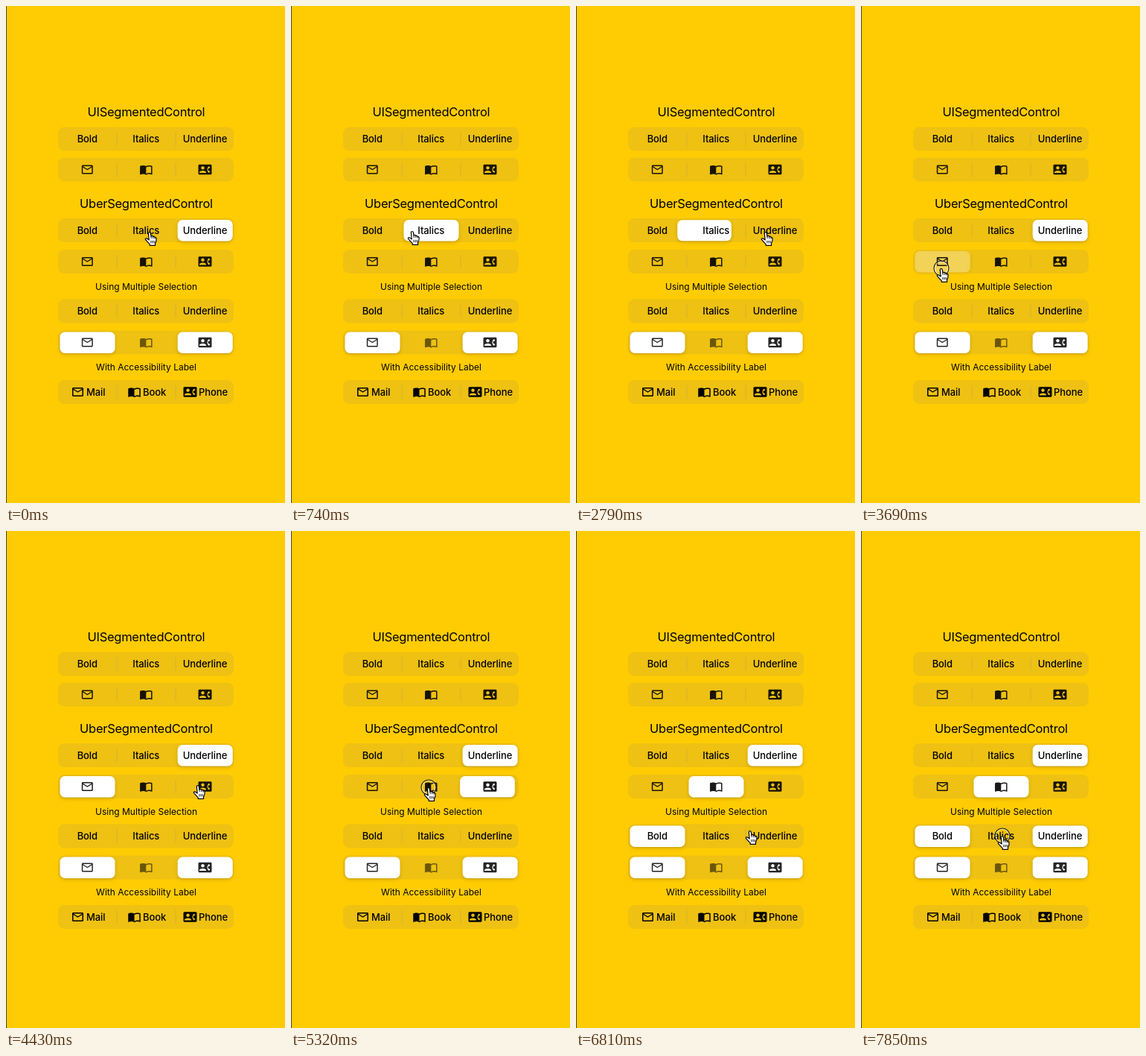
These frames come from a looping animation (375x667 px, 7.99 s). An HTML page:

```html
<!DOCTYPE html>
<html lang="en">
<head>
<meta charset="utf-8">
<title>Segmented controls</title>
<style>
  html, body { margin: 0; width: 100%; height: 100%; overflow: hidden; background: #ffcc03; }
  svg { display: block; width: 100vw; height: 100vh; }
  text { font-family: Inter, "Liberation Sans", sans-serif; fill: #000; text-anchor: middle; }
  .title { font-size: 16.5px; letter-spacing: -.28px; }
  .label { font-size: 13px; font-weight: 500; letter-spacing: -.1px; }
  .note { font-size: 12px; }
  .thumb { fill: #fff; filter: drop-shadow(0 2px 2.5px rgba(0, 0, 0, .16)); }
</style>
</head>
<body>
<svg id="stage" viewBox="0 0 375 667">
  <defs>
    <path id="mail" d="M20 4H4c-1.1 0-1.99.9-1.99 2L2 18c0 1.1.9 2 2 2h16c1.1 0 2-.9 2-2V6c0-1.1-.9-2-2-2zm0 14H4V8l8 5 8-5v10zm-8-7L4 6h16l-8 5z"/>
    <path id="book" d="M21 5c-1.11-.35-2.33-.5-3.5-.5-1.95 0-4.05.4-5.5 1.5-1.45-1.1-3.55-1.5-5.5-1.5S2.45 4.9 1 6v14.65c0 .25.25.5.5.5.1 0 .15-.05.25-.05C3.1 20.45 5.05 20 6.5 20c1.95 0 4.05.4 5.5 1.5 1.35-.85 3.8-1.5 5.5-1.5 1.65 0 3.35.3 4.75 1.05.1.05.15.05.25.05.25 0 .5-.25.5-.5V6c-.6-.45-1.25-.75-2-1zm0 13.5c-1.1-.35-2.3-.5-3.5-.5-1.7 0-4.15.65-5.5 1.5V8c1.35-.85 3.8-1.5 5.5-1.5 1.2 0 2.4.15 3.5.5v11.5z"/>
    <path id="phone" d="M22 3H2C.9 3 0 3.9 0 5v14c0 1.1.9 2 2 2h20c1.1 0 1.99-.9 1.99-2L24 5c0-1.1-.9-2-2-2zM8 6c1.66 0 3 1.34 3 3s-1.34 3-3 3-3-1.34-3-3 1.34-3 3-3zm6 12H2v-1c0-2 4-3.1 6-3.1s6 1.1 6 3.1v1zm3.85-4h1.64L21 16l-1.99 1.99c-1.31-.98-2.28-2.38-2.73-3.99-.18-.64-.28-1.31-.28-2s.1-1.36.28-2c.45-1.62 1.42-3.01 2.73-3.99L21 8l-1.51 2h-1.64c-.22.63-.35 1.3-.35 2s.13 1.37.35 2z"/>
  </defs>
  <rect width="375" height="667" fill="#ffcc03"/>
  <rect width="1" height="667" fill="#4b463c"/>
  <g id="rows"></g>
  <g id="ring" fill="none">
    <circle r="9" stroke="#fff" stroke-opacity=".75" stroke-width="1.2"/>
    <circle r="10" stroke="#1c1a12" stroke-width="1.1"/>
  </g>
  <g id="hand">
    <path d="M-1.7 1.9C-1.8 .1 1.1 .1 1.3 1.9L2 6.3C2.5 5 4.6 5.2 4.7 6.8C5.3 5.8 7 6.2 7.1 7.7C8 7.1 9.1 7.8 9.1 9.2C9.2 12 8.7 13.6 7.6 15.3L7.5 18.4H.3L.1 16.5C-2 14.8-3.6 12.5-5.4 10.6C-6.4 9.3-4.5 8.2-3.2 9.2L-.8 11Z"
      fill="#fff" stroke="#000" stroke-width="1.2" stroke-linejoin="round"/>
    <path d="M1.9 11.9V15.3M4.1 11.9V15.3M6.2 11.9V15.3M2 6.3L2.3 9M4.7 6.8L4.8 9.2M7.1 7.7L7 9.5" fill="none" stroke="#000" stroke-width=".9"/>
  </g>
</svg>
<script>
const LOOP = 7990, TICK = 148, TICKS = 54;
const COLS = [109.3, 188.3, 267.5];
const WORDS = ["Bold", "Italics", "Underline"];
const ICONS = ["mail", "book", "phone"];
const el = id => document.getElementById(id);
const clamp = v => Math.min(1, Math.max(0, v));
const smooth = p => p * p * (3 - 2 * p);
const cubic = p => p < .5 ? 4 * p ** 3 : 1 - 4 * (1 - p) ** 3;

function add(parent, tag, attrs, text) {
  const node = document.createElementNS("http://www.w3.org/2000/svg", tag);
  for (const key in attrs) node.setAttribute(key, attrs[key]);
  if (text) node.textContent = text;
  return parent.appendChild(node);
}

function text(parent, cls, x, y, str) {
  return add(parent, "text", { class: cls, x, y }, str);
}

function icon(parent, name, x, y, opacity = .9) {
  add(parent, "use", {
    href: "#" + name, opacity,
    transform: `translate(${x - 9} ${y - 9}) scale(.75)`
  });
}

// One control: track, separators, thumbs, then its content on top.
function control(y, thumbCount, fill) {
  const g = add(el("rows"), "g", {});
  add(g, "rect", { x: 70, y, width: 236, height: 32, rx: 8.5, fill: "#767680", "fill-opacity": .12 });
  const seps = [149, 228].map(x =>
    add(g, "rect", { x: x - .5, y: y + 7, width: 1, height: 18, fill: "#8e8e93", "fill-opacity": .26 }));
  const thumbs = Array.from({ length: thumbCount }, () =>
    add(g, "rect", { class: "thumb", x: -37, y: -14.2, width: 74, height: 28.4, rx: 6.5 }));
  fill(g, y + 16);
  return { y, seps, thumbs };
}

const words = (g, cy) => WORDS.forEach((w, i) => text(g, "label", COLS[i], cy + 4.6, w));
const icons = (g, cy) => ICONS.forEach((n, i) => icon(g, n, COLS[i], cy));
const dimmed = (g, cy) => ICONS.forEach((n, i) => icon(g, n, COLS[i], cy, i === 1 ? .55 : .85));
const labelled = (g, cy) => ["Mail", "Book", "Phone"].forEach((w, i) => {
  icon(g, ICONS[i], [96.5, 172.5, 247.5][i], cy, 1);
  text(g, "label", [120.7, 199.5, 278.5][i], cy + 4.6, w);
});

const rows = el("rows");
text(rows, "title", 188.4, 148, "UISegmentedControl");
text(rows, "title", 188.4, 270.5, "UberSegmentedControl");
text(rows, "note", 188.5, 381, "Using Multiple Selection");
text(rows, "note", 188.5, 489, "With Accessibility Label");
control(162.5, 0, words);
control(203.5, 0, icons);
const single = control(285, 1, words);
const singleIcons = control(327, 1, icons);
const multi = control(393.5, 2, words);
const multiIcons = control(435.5, 2, dimmed);
control(502, 0, labelled);

// Slides: [start tick, target column].
const textSlides = [[1.2, 1], [8.26, 0], [16.98, 2]];
const iconSlides = [[30.5, 2], [35.5, 1]];
const taps = [1.2, 8.26, 16.3, 24.6, 30.5, 35.5, 40.5, 48.5, 52.5];

// Fingertip path: [tick, x, y].
const path = [
  [0, 193, 303], [3, 193, 303], [8, 108, 300], [10.5, 108, 300],
  [16, 255, 303], [19, 255, 303], [24, 108, 352], [26, 108, 352],
  [30, 258, 341], [31.5, 258, 341], [35, 185, 344], [37, 185, 344],
  [40, 115, 401], [42, 115, 401], [46, 234, 402], [48, 248, 407],
  [49.5, 248, 407], [52, 190, 409], [54, 190, 409]
];

function slide(k, from, moves) {
  let x = COLS[from], scale = 1;
  for (const [start, to] of moves) {
    const p = clamp((k - start) / 2.2);
    x += (COLS[to] - x) * cubic(p);
    scale -= .03 * Math.sin(Math.PI * p * p);
  }
  return { x, scale, opacity: 1 };
}

const fade = (k, start, col) => ({ x: COLS[col], scale: 1, opacity: clamp((k - start) / 1.4) });

function setThumbs(row, states) {
  states.forEach((s, i) => {
    row.thumbs[i].setAttribute("transform", `translate(${s.x + .2} ${row.y + 16.2}) scale(${s.scale})`);
    row.thumbs[i].setAttribute("opacity", s.opacity);
  });
  row.seps.forEach((sep, i) => {
    const near = states.filter(s => Math.abs(s.x - 149 - 79 * i) < 45);
    sep.setAttribute("opacity", 1 - Math.max(0, ...near.map(s => s.opacity)));
  });
}

function fingertip(k) {
  const i = Math.max(1, path.findIndex(p => p[0] >= k));
  const [t0, x0, y0] = path[i - 1], [t1, x1, y1] = path[i];
  const p = smooth((k - t0) / (t1 - t0));
  return `translate(${x0 + (x1 - x0) * p} ${y0 + (y1 - y0) * p})`;
}

function draw(ms) {
  const k = Math.min(TICKS - 1, Math.floor((ms % LOOP + 12) / TICK));
  const shown = fade(k, 24.6, 0);
  setThumbs(single, [slide(k, 2, textSlides)]);
  setThumbs(singleIcons, [{ ...slide(k, 0, iconSlides), opacity: shown.opacity }]);
  setThumbs(multi, [fade(k, 40.5, 0), fade(k, 48.5, 2)]);
  setThumbs(multiIcons, [fade(k, -9, 0), fade(k, -9, 2)]);
  const tip = fingertip(k);
  el("hand").setAttribute("transform", tip);
  el("ring").setAttribute("transform", tip);
  el("ring").setAttribute("opacity", taps.some(t => k >= t && k < t + .95) ? 1 : 0);
}

let begin;
function tick(now) {
  begin ??= now;
  draw(now - begin);
  requestAnimationFrame(tick);
}
draw(0);
requestAnimationFrame(tick);
</script>
</body>
</html>
```
